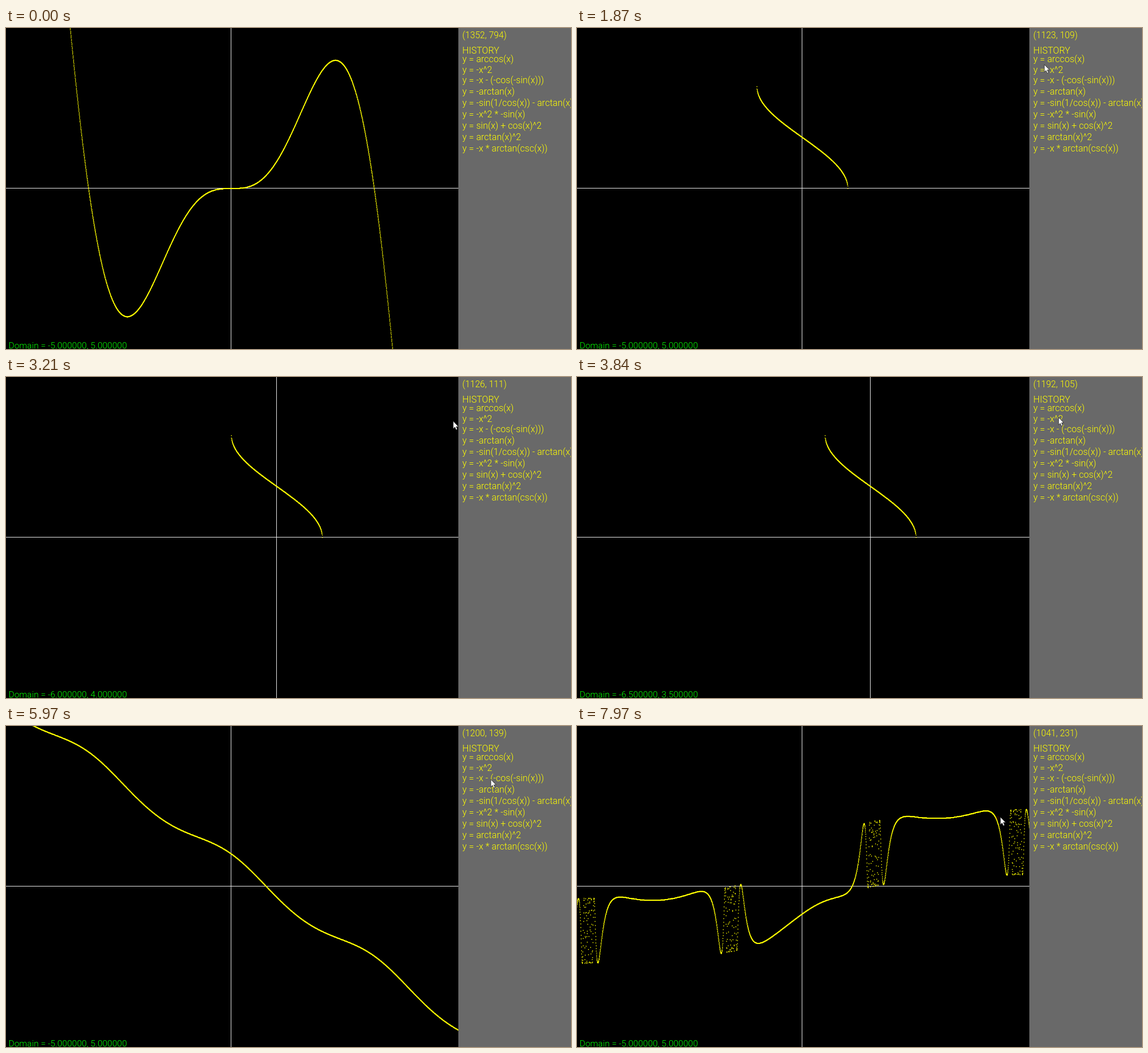
An HTML page with a canvas that plays this animation: 993x564 px, repeating every 8000 ms.

```html
<!DOCTYPE html>
<html lang="en">
<head>
<meta charset="utf-8">
<title>Function grapher</title>
<style>
html, body { margin: 0; width: 100%; height: 100%; overflow: hidden; background: #000; }
#stage { position: relative; width: 993px; height: 564px; overflow: hidden; background: #000; }
#stage > * { position: absolute; }
canvas { left: 0; top: 0; }
#panel { left: 795px; top: 0; width: 198px; height: 564px; background: #696969; }
.text { font: 300 16.1px/20px Roboto, sans-serif; color: #ff0; white-space: pre; left: 802px; }
#mouse { font-size: 15.7px; }
#domain { left: 4.5px; font-size: 15.5px; color: #0f0; }
#dot { left: -3.5px; top: -3.5px; width: 7px; height: 7px; border-radius: 50%; background: #f00; }
#cursor { left: -1px; top: -1px; }
</style>
</head>
<body>
<div id="stage">
  <canvas id="graph" width="993" height="564"></canvas>
  <div id="panel"></div>
  <div id="domain" class="text"></div>
  <div id="mouse" class="text"></div>
  <div id="dot"></div>
  <svg id="cursor" width="13" height="19" viewBox="-1 -1 13 19">
    <path d="M0 0V13.2L3 10.5L5 15.3L7.3 14.3L5.3 9.6H9.2Z" fill="#fff" stroke="#222" stroke-width=".8"/>
  </svg>
</div>
<script>
const LOOP = 8000, SCALE = 0.7134, SHIFT = -4;
const GRAPH_W = 1120, GRAPH_H = 800, SAMPLES = GRAPH_W * 3;
const $ = id => document.getElementById(id);
const ctx = $('graph').getContext('2d');
const toStage = v => v * SCALE + SHIFT;
const clamp = (v, lo, hi) => Math.min(hi, Math.max(lo, v));

const cubicSine = x => x * x * Math.sin(x);
const parabola = x => -x * x;
const wave = x => -x + Math.cos(-Math.sin(x));
const arctan = x => -Math.atan(x);
const secant = x => -Math.sin(1 / Math.cos(x)) + Math.atan(x);

function curveAt(t) {
  if (t < 1430) return cubicSine;
  if (t < 3950) return Math.acos;
  if (t < 5720) return parabola;
  if (t < 6450) return wave;
  return t < 6960 ? arctan : secant;
}

// arccos is panned in quarter steps, the parabola is zoomed in twice and out again
function domainAt(t, curve) {
  if (curve === Math.acos) {
    const pan = clamp(Math.floor((t - 2575) / 144), 0, 6) / 4;
    return [-5 - pan, 5 - pan];
  }
  const step = Math.floor((t - 4870) / 160);
  const half = 5 / 2 ** Math.max(0, 2 - Math.abs(step - 1));
  return [-half, half];
}

// time, window x, window y
const path = [
  [69, 1352, 794], [72, 1314, 756], [450, 860, 560], [820, 500, 440],
  [1000, 755, 286], [1030, 767, 274], [1080, 800, 255], [1380, 1180, 84],
  [1580, 1192, 82], [1810, 1192, 82], [2050, 920, 187], [2100, 909, 180],
  [2430, 909, 180], [2690, 909, 153], [2860, 909, 153], [3250, 1150, 106],
  [3440, 1192, 105], [3840, 1192, 105], [4060, 1188, 105], [4360, 1188, 105],
  [4430, 1189, 109], [5520, 1189, 109], [5700, 1197, 131], [5940, 1200, 137],
  [6900, 1200, 191], [7130, 1198, 199], [7330, 1180, 210], [7530, 1180, 210],
  [7965, 1041, 231]
];

function mouseAt(t) {
  const found = path.findIndex(p => p[0] >= t);
  const i = found < 0 ? path.length - 1 : Math.max(1, found);
  const [t0, x0, y0] = path[i - 1], [t1, x1, y1] = path[i];
  const k = clamp((t - t0) / (t1 - t0), 0, 1);
  return [x0 + (x1 - x0) * k, y0 + (y1 - y0) * k];
}

function dotAlpha(t) {
  if (t > 7750) return clamp((7960 - t) / 210, 0.1, 1);
  return t > 2660 && t < 2860 ? 0.5 : 1;
}

// 20px line box: the baseline sits about 15.5px below its top
function place(el, baseline) {
  el.style.top = baseline - 15.5 + 'px';
}

function addRow(label, baseline) {
  const el = document.createElement('div');
  el.className = 'text';
  el.textContent = label;
  place(el, baseline);
  $('stage').insertBefore(el, $('dot'));
}

const rows = ['arccos(x)', '-x^2', '-x - (-cos(-sin(x)))', '-arctan(x)',
  '-sin(1/cos(x)) - arctan(x)', '-x^2 * -sin(x)', 'sin(x) + cos(x)^2',
  'arctan(x)^2', '-x * arctan(csc(x))'];
addRow('HISTORY', 45);
rows.forEach((row, i) => addRow('y = ' + row, (i < 2 ? 60 : 58) + i * 19.9));
place($('mouse'), 18);
place($('domain'), 563.5);

function drawGraph(curve, a, b) {
  const span = b - a;
  ctx.setTransform(1, 0, 0, 1, 0, 0);
  ctx.clearRect(0, 0, 993, 564);
  ctx.fillStyle = '#e8e8e8';
  ctx.fillRect(Math.floor(toStage(-a / span * GRAPH_W)), 0, 1, 564);
  ctx.fillRect(0, Math.floor(toStage(GRAPH_H / 2)), 795, 1);
  ctx.setTransform(SCALE, 0, 0, SCALE, SHIFT, SHIFT);
  ctx.fillStyle = '#ff0';
  for (let i = 0; i <= SAMPLES; i++) {
    const y = GRAPH_H / 2 - curve(a + span * i / SAMPLES) * GRAPH_H / span;
    if (y > -5 && y < GRAPH_H + 5) {
      ctx.fillRect(Math.round(i * GRAPH_W / SAMPLES), Math.round(y), 2, 2);
    }
  }
  $('domain').textContent = `Domain = ${a.toFixed(6)}, ${b.toFixed(6)}`;
}

function moveTo(el, x, y) {
  el.style.transform = `translate(${toStage(x)}px, ${toStage(y)}px)`;
}

let shown;
function frame(t) {
  const curve = curveAt(t), [a, b] = domainAt(t, curve);
  const view = curve.name + a;
  if (view !== shown) {
    shown = view;
    drawGraph(curve, a, b);
  }

  const [x, y] = mouseAt(t);
  const visible = t >= 70;
  $('mouse').textContent = `(${Math.round(x)}, ${Math.round(y)})`;
  moveTo($('dot'), x, y);
  // the pointer trails the dot slightly
  moveTo($('cursor'), ...mouseAt(t < 110 ? t : t - 30));
  $('dot').style.opacity = visible && x < GRAPH_W ? dotAlpha(t) : 0;
  $('cursor').style.opacity = visible ? 1 : 0;
}

const start = performance.now();
function tick() {
  frame((performance.now() - start) % LOOP);
  requestAnimationFrame(tick);
}
tick();
</script>
</body>
</html>
```
